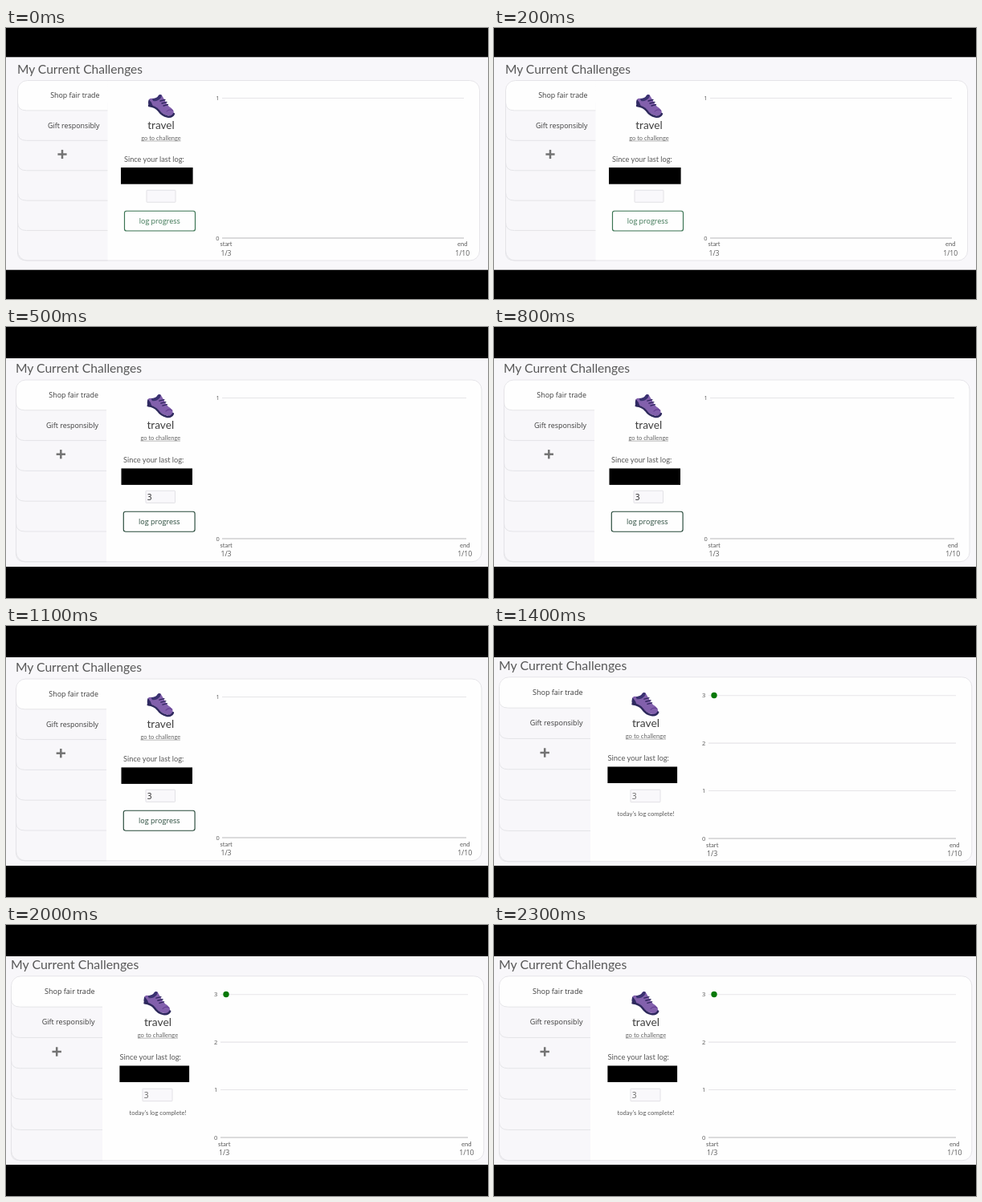
An HTML page for the animation above (2.4 s loop, 600 by 338 pixels).

```html
<!DOCTYPE html>
<html lang="en">
<head>
<meta charset="utf-8">
<title>Challenge log</title>
<style>
  html, body { margin: 0; width: 100%; height: 100%; overflow: hidden; background: #000; }
  svg { display: block; width: 100vw; height: 100vh; }
  .light { font-family: Lato, "Open Sans", sans-serif; }
  .label { font-family: "Open Sans", "Noto Sans", sans-serif; }
</style>
</head>
<body>
<svg id="stage" viewBox="0 0 600 338"></svg>
<script>
const LOOP = 2400;
const stage = document.getElementById("stage");

// Each view is one layout of the same page; the cuts between them are hard.
const views = [
  { from: 0, zoom: 1, band: [36.3, 301.7], title: [14, 57],
    panel: [14.5, 65.5, 589.5, 290], tabRight: 126.5, tabText: [116.5, 87, 124.5], plus: [70, 157.5],
    shoe: [177, 82], mid: 193, name: 126, link: 140, since: [147, 167],
    mask: [143, 174, 89.6, 20.7], input: [175, 202.3, 36, 15],
    button: [147.5, 228.2, 88, 24.8], buttonColor: "#397351", buttonText: [191.3, 243.6],
    chart: [269, 570, 87.5, 262], tickRight: 265.5, ends: [274, 568.2], endText: [272, 283.5], max: 1 },
  { from: 500, zoom: 1.008, band: [39, 299], title: [12, 57],
    panel: [12.5, 66, 592, 292.8], tabRight: 125, tabText: [115, 88, 125.5], plus: [68.3, 158.7],
    shoe: [175.7, 83], mid: 192.3, name: 127.2, link: 141.2, since: [146, 168.5],
    mask: [143.5, 176.4, 88.5, 20.5], input: [174, 204.2, 36.5, 15.2], value: "#222",
    button: [146.3, 230.2, 88.8, 25], buttonColor: "#27493a", buttonText: [190.8, 245.7],
    chart: [269, 573, 88.5, 264], tickRight: 265.7, ends: [274, 571.2], endText: [274.5, 286], max: 1 },
  { from: 1400, zoom: 1.022, band: [39, 299], title: [6, 55],
    panel: [6.5, 63.8, 594.8, 293.8], tabRight: 120, tabText: [110.5, 86.3, 124.4], plus: [63.2, 158],
    shoe: [171.5, 82], mid: 189, name: 126.3, link: 140.2, since: [141.5, 167.6],
    mask: [141.4, 175.5, 86.7, 20.5], input: [170, 204.2, 37, 15.5], value: "#666",
    done: 236.7,
    chart: [267, 575, 86.7, 265], tickRight: 263.3, ends: [271.7, 573.3], endText: [275.7, 287], max: 3,
    dot: [274, 86.5] }
];

const rect = ([x, y, w, h], attrs) =>
  `<rect x="${x}" y="${y}" width="${w}" height="${h}" ${attrs}/>`;
const line = (x1, y1, x2, y2, color, width = 1) =>
  `<path d="M${x1} ${y1}L${x2} ${y2}" stroke="${color}" stroke-width="${width}"/>`;
const text = (x, y, str, size, { font = "light", anchor = "start", fill = "#585858" } = {}) =>
  `<text x="${x}" y="${y}" class="${font}" font-size="${size}" text-anchor="${anchor}" fill="${fill}">${str}</text>`;

function drawTabs(v) {
  const [left, top, , bottom] = v.panel;
  const right = v.tabRight;
  const pitch = (bottom - top) / 6;
  let out = `<path d="M${left} ${top + pitch - 10}H${right}V${bottom}H${left + 12}Q${left} ${bottom} ${left} ${bottom - 12}Z" fill="#f8f7fa"/>`;
  for (let i = 0; i < 6; i++) {
    const y = top + i * pitch;
    const start = i ? y - 2 : y + 12;
    const edge = `M${left} ${start}V${y + pitch - 10}q0 10 11 10H${right}`;
    if (!i) out += `<path d="${edge}V${y + 0.5}H${left + 12}Q${left} ${y} ${left} ${start}Z" fill="#fefefe"/>`;
    out += `<path d="${edge}" fill="none" stroke="#e3e2e6" stroke-width=".9"/>`;
  }
  const style = { font: "label", anchor: "end", fill: "#3c3c3c" };
  const [x, y1, y2] = v.tabText;
  const [px, py] = v.plus;
  const arm = 5.6 * v.zoom;
  return out
    + text(x, y1, "Shop fair trade", 8.85 * v.zoom, style)
    + text(x, y2, "Gift responsibly", 8.85 * v.zoom, style)
    + line(px - arm, py, px + arm, py, "#737373", 2.5)
    + line(px, py - arm, px, py + arm, "#737373", 2.5);
}

function drawShoe([x, y], zoom) {
  return `<g transform="translate(${x} ${y}) scale(${zoom})" stroke-linecap="round" fill="none">
    <path d="M1 7Q3 5 6 6Q11 6 13 2Q15 0 17 2L20 7Q22 12 26 16Q32 19 32 25Q29 29 23 27Q17 25 13 20Q9 15 2 15Q0 11 1 7Z" fill="#8260ac"/>
    <path d="M5 6Q11 6 13 2Q15 0 17 2L16 5Q12 10 6 9Z" fill="#3a3270"/>
    <path d="M1 7Q5 11 6 16L1 16Q-1 11 1 7Z" fill="#302a63"/>
    <path d="M1 15Q9 16 13 21Q17 27 24 28.5Q30 29.5 32 25" stroke="#2d285c" stroke-width="2.4"/>
    <path d="M23 22Q27 18 31 21" stroke="#654093" stroke-width="1"/>
    <path d="M15 9L21 7.5M17 12L23 10.5M19 15L24.5 13.5" stroke="#30265f" stroke-width="1.3"/>
  </g>`;
}

function drawLog(v) {
  const z = v.zoom;
  const linkHalf = 24.5 * z;
  let out = drawShoe(v.shoe, z)
    + text(v.mid, v.name, "travel", 13.6 * z, { anchor: "middle", fill: "#404040" })
    + text(v.mid, v.link, "go to challenge", 7.45 * z, { anchor: "middle", fill: "#666" })
    + line(v.mid - linkHalf, v.link + 1, v.mid + linkHalf, v.link + 1, "#888", 0.6)
    + text(...v.since, "Since your last log:", 9.2 * z)
    + rect(v.mask, 'fill="#000"')
    + rect(v.input, 'rx=".6" fill="#f9f8fb" stroke="#e0dfe4" stroke-width=".9"');
  if (v.value) {
    const [x, y] = v.input;
    out += text(x + 1.7, y + 11.4, "3", 10 * z, { font: "label", fill: v.value });
  }
  if (v.button) {
    out += rect(v.button, `rx="2.6" fill="#fefefe" stroke="${v.buttonColor}" stroke-width="1.15"`)
      + text(...v.buttonText, "log progress", 8.95 * z,
          { font: "label", anchor: "middle", fill: v.buttonColor });
  }
  if (v.done) out += text(v.mid, v.done, "today's log complete!", 7.5 * z, { anchor: "middle" });
  return out;
}

function drawChart(v) {
  const z = v.zoom;
  const [left, right, top, base] = v.chart;
  let out = "";
  for (let n = 0; n <= v.max; n++) {
    const y = base + (top - base) * n / v.max;
    out += line(left, y, right, y, n ? "#e6e5e8" : "#bababc", 1.1)
      + text(v.tickRight, y + 2.6, n, 7.4 * z, { font: "label", anchor: "end" });
  }
  [["start", "1/3"], ["end", "1/10"]].forEach(([name, date], i) => {
    out += text(v.ends[i], v.endText[0], name, 7.5 * z, { anchor: "middle" })
      + text(v.ends[i], v.endText[1], date, 8.6 * z, { font: "label", anchor: "middle" });
  });
  if (v.dot) out += `<circle cx="${v.dot[0]}" cy="${v.dot[1]}" r="3.7" fill="#087908"/>`;
  return out;
}

function drawView(v) {
  const [left, top, right, bottom] = v.panel;
  const [bandTop, bandBottom] = v.band;
  const box = [left, top, right - left, bottom - top];
  return rect([0, 0, 600, 338], 'fill="#000"')
    + rect([0, bandTop, 600, bandBottom - bandTop], 'fill="#f8f7fa"')
    + text(...v.title, "My Current Challenges", 15.55 * v.zoom)
    + rect(box, 'rx="12" fill="#fefefe"')
    + drawTabs(v)
    + rect(box, 'rx="12" fill="none" stroke="#e4e3e7" stroke-width=".9"')
    + drawLog(v)
    + drawChart(v);
}

stage.innerHTML = views.map(v => `<g>${drawView(v)}</g>`).join("");
const layers = [...stage.children];
const began = performance.now();

function render(ms) {
  const t = ms % LOOP;
  const current = views.findLastIndex(v => t >= v.from);
  layers.forEach((layer, i) => layer.setAttribute("display", i === current ? "inline" : "none"));
}

function tick() {
  render(performance.now() - began);
  requestAnimationFrame(tick);
}
tick();
</script>
</body>
</html>
```
